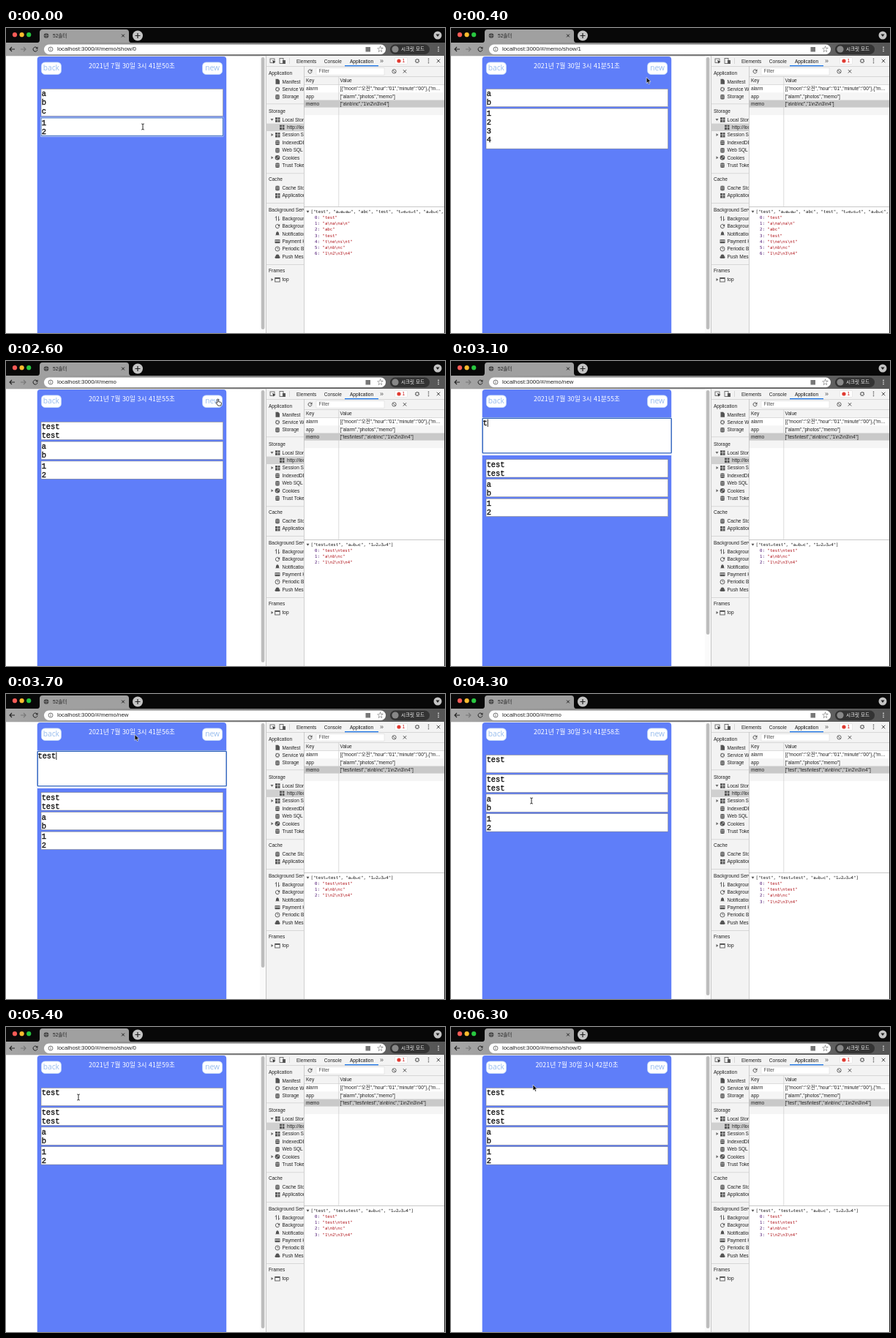
Animation of 600x417 px, one loop 6400 ms. Source, as an HTML page:

```html
<!DOCTYPE html>
<html lang="ko">
<head>
<meta charset="utf-8">
<style>
  html, body { margin: 0; width: 100%; height: 100%; overflow: hidden; background: #fff; }
  svg { display: block; width: 600px; height: 417px; font: 6.55px "Liberation Sans", "Noto Sans CJK KR", "Noto Sans CJK", sans-serif; }
  text { white-space: pre; }
  .mono { font: 5.7px "DejaVu Sans Mono", monospace; }
  .memo { font: 10.3px "Liberation Mono", monospace; stroke: #111; stroke-width: .35px; }
  .clock { font: 500 8.9px "Noto Sans CJK KR", "Noto Sans CJK", sans-serif; }
  .button { font: 10.2px "Open Sans", sans-serif; }
  .url { font-size: 7.84px; }
</style>
</head>
<body>
<svg viewBox="0 0 600 417">
  <defs>
    <linearGradient id="bar"><stop stop-color="#a6a6a6"/><stop offset=".4" stop-color="#858585"/><stop offset="1" stop-color="#555"/></linearGradient>
    <clipPath id="side"><path d="M355 38h52v379h-52z"/></clipPath>
    <clipPath id="pane"><path d="M407 38h191v379H407z"/></clipPath>
  </defs>
  <g id="chrome"></g>
  <g id="page"></g>
  <g id="tools"></g>
  <g id="data" clip-path="url(#pane)"></g>
  <g id="pointer"></g>
</svg>
<script>
const LOOP = 6400;
const BLUE = '#5f7ef9';
const $ = id => document.getElementById(id);
const esc = s => s.replace(/&/g, '&amp;').replace(/</g, '&lt;');
const rect = (x, y, w, h, fill, more = '') => `<rect x="${x}" y="${y}" width="${w}" height="${h}" fill="${fill}" ${more}/>`;
const dot = (x, y, r, fill, more = '') => `<circle cx="${x}" cy="${y}" r="${r}" fill="${fill}" ${more}/>`;
const ring = (x, y, r, width, dash = '') => dot(x, y, r, 'none', `stroke="#555" stroke-width="${width}" stroke-dasharray="${dash}"`);
const line = (d, color = '#555', width = 1, fill = 'none') => `<path d="${d}" fill="${fill}" stroke="${color}" stroke-width="${width}"/>`;
const text = (x, y, s, fill = '#222', more = '') => `<text x="${x}" y="${y}" fill="${fill}" ${more}>${esc(s)}</text>`;
const cross = (x, y, r, color, width = 1) => line(`M${x - r} ${y - r}l${2 * r} ${2 * r}m0 ${-2 * r}l${-2 * r} ${2 * r}`, color, width);
const kebab = (x, y, color) => [-2.6, 0, 2.6].map(d => dot(x, y + d, .8, color)).join('');
const reload = (x, y, r, color) => line(`M${x + r * .7} ${y - r * .7}A${r} ${r} 0 1 0 ${x + r} ${y + r * .2}`, color)
  + `<path d="M${x + r + .5} ${y - r - .5}v3h-3z" fill="${color}"/>`;

// Browser frame
function drawChrome() {
  const lights = ['#fc5b57', '#fdbc2e', '#28c840'].map((c, i) => dot(12 + i * 9.6, 9.2, 3.1, c)).join('');
  return rect(0, 0, 600, 20, '#080808') + lights
    + `<path d="M43 20q3 0 3-4V6q0-4 4-4H164q4 0 4 4v10q0 4 3 4z" fill="#a0a0a0"/>`
    + dot(55, 10.5, 3.3, '#444') + line('M52 10.5h6M55 7.5v6', '#999', .6)
    + text(64, 12.7, '52솔터') + cross(160, 10.5, 1.9, '#222')
    + dot(180, 10.5, 7, '#c4c4c4') + line('M176.5 10.5h7M180 7v7', '#222', 1.2)
    + dot(590, 10, 5.5, '#c4c4c4') + '<path d="M587.5 8.5h5l-2.5 3.5z" fill="#222"/>'
    + rect(0, 20, 600, 18.5, 'url(#bar)')
    + line('M12 29H5m3-3l-3 3 3 3', '#222', 1.1) + line('M20 29h7m-3-3l3 3-3 3', '#777', 1.1)
    + reload(40, 29, 3, '#222')
    + rect(52, 22.5, 467, 13.5, '#fff', 'rx="6.7"')
    + ring(61, 29, 3, .8) + line('M61 28.5v2.2M61 27v.8', '#555', .8)
    + rect(491.5, 26, 6.5, 6.5, '#777') + text(507, 32, '☆', '#333', 'font-size="9"')
    + rect(525, 22.5, 54, 13.5, '#333', 'rx="6.7"') + dot(532, 29, 4.6, '#888')
    + text(540, 31.4, '시크릿 모드', '#fff') + kebab(591, 29, '#f0f0f0');
}

// Developer tools: everything that never changes
function drawTools() {
  const icons = {
    db: y => rect(368, y - 3, 6, 6.5, '#555', 'rx="2"') + line(`M368 ${y - 1}h6m-6 2.2h6`, '#f3f3f3', .6),
    gear: y => ring(371, y, 2.3, 1.5, '1.4 .5'),
    grid: (y, x = 368) => rect(x, y - 3, 6.5, 6.5, '#555') + line(`M${x} ${y}h7m-3.5-3v6.5`, '#f3f3f3', .6),
    file: y => `<path d="M368.5 ${y - 3.5}h3.5l2 2v5h-5.5z" fill="#555"/>`,
    cookie: y => dot(371, y, 3.3, '#555') + dot(372, y - 1, .8, '#f3f3f3') + dot(370, y + 1, .7, '#f3f3f3'),
    arrows: y => line(`M369.5 ${y + 3}v-6l-1.5 2m4.5-2v6l1.5-2`, '#555', .9),
    bell: y => `<path d="M368 ${y + 2}l1-1v-2q2-4 4 0v2l1 1z" fill="#555"/>`,
    card: y => rect(367.5, y - 2.5, 7, 5, '#555', 'rx=".6"') + rect(367.5, y - 1, 7, 1, '#f3f3f3'),
    clock: y => ring(371, y, 3, .9) + line(`M371 ${y - 2}v2h1.5`, '#555', .7),
    sync: y => reload(371, y, 2.6, '#555'),
    cloud: y => dot(371, y - .5, 2.5, '#555') + rect(367.5, y - .5, 7, 3, '#555', 'rx="1.5"'),
    frame: y => rect(367.7, y - 2.5, 6.5, 5.5, 'none', 'stroke="#555" stroke-width=".9"') + rect(368, y - 2.5, 6, 1.5, '#555')
  };
  const heading = (y, s) => text(359, y + 2.4, s);
  const item = (y, s, icon, open = '') => icons[icon](y) + text(377.5, y + 2.4, s)
    + (open && `<path d="${open === 'down' ? `M361.5 ${y - 1.3}h4l-2 3z` : `M362.5 ${y - 2}v4l3-2z`}" fill="#666"/>`);
  const sidebar = rect(355, 130.6, 52, 10.4, '#d0d0d0')
    + [[61.5, 'Application'], [113.5, 'Storage'], [207, 'Cache'], [249, 'Background Services'], [331.5, 'Frames']].map(a => heading(...a)).join('')
    + [103.5, 198.5, 239, 323].map(y => rect(355, y, 52, .7, '#ccc')).join('')
    + [[73.2, 'Manifest', 'file'], [83.7, 'Service Workers', 'gear'], [94, 'Storage', 'db'],
       [125.3, 'Local Storage', 'grid', 'down'], [146, 'Session Storage', 'grid', 'right'], [156.4, 'IndexedDB', 'db'],
       [167, 'Web SQL', 'db'], [177.2, 'Cookies', 'cookie', 'right'], [187.5, 'Trust Tokens', 'db'],
       [218.7, 'Cache Storage', 'db'], [229, 'Application Cache', 'grid'],
       [260.5, 'Background Fetch', 'arrows'], [271, 'Background Sync', 'sync'], [281.3, 'Notifications', 'bell'],
       [291.7, 'Payment Handler', 'card'], [302, 'Periodic Background Sync', 'clock'], [312.4, 'Push Messaging', 'cloud'],
       [344, 'top', 'frame', 'right']].map(a => item(...a)).join('')
    + icons.grid(135.6, 374) + text(384, 137.9, 'http://localhost:3000');
  const cell = (y, key, value) => text(410, y, key) + text(456.5, y, value);
  return rect(355, 38, 245, 379, '#f3f3f3') + rect(355, 38, .8, 379, '#bbb')
    + rect(361, 42, 6, 5.5, 'none', 'stroke="#555" stroke-width=".8"') + '<path d="M364 44l4.5 2-2 .7-.8 2z" fill="#333"/>'
    + rect(374, 41.5, 5, 7, 'none', 'stroke="#555" stroke-width=".8"') + rect(378, 44, 4, 5, '#555')
    + rect(387, 41, .7, 8, '#ccc')
    + text(397, 47.6, 'Elements') + text(434.8, 47.6, 'Console') + text(470, 47.6, 'Application', '#111') + text(511, 47.6, '»', '#555', 'font-size="9"')
    + rect(531.5, 40.5, 17, 9, '#fff', 'stroke="#ddd" stroke-width=".6" rx="1"') + dot(537, 45, 2.6, '#e03a31') + text(541.5, 47.4, '1', '#c22')
    + ring(562, 45, 2.3, 1.6, '1.3 .5') + kebab(577.5, 45, '#555') + cross(591, 45, 2.3, '#555')
    + rect(355, 52, 245, .7, '#ccc') + rect(463, 51, 46, 1.3, '#1a73e8')
    + `<g clip-path="url(#side)">${sidebar}</g>`
    + rect(407, 77, 192, 340, '#fff')
    + reload(415.5, 59.3, 2.5, '#555') + rect(424, 54.5, 93, 9.7, '#fff', 'stroke="#ddd" stroke-width=".6"') + text(427.5, 61.4, 'Filter', '#555')
    + ring(530.5, 59.3, 2.7, .9) + line('M528.6 57.4l3.8 3.8', '#555', .9) + cross(545, 59.3, 2.2, '#555')
    + rect(407, 66, 192, .7, '#ccc') + rect(407, 77, 192, .7, '#ccc')
    + cell(74.4, 'Key', 'Value') + rect(407, 88.2, 192, 10.3, '#f5f5f5') + rect(407, 98.5, 192, 10.3, '#c9c9c9') + rect(407, 108.8, 192, 10.3, '#f5f5f5')
    + cell(85.4, 'alarm', '[{"moon":"오전","hour":"01","minute":"00"},{"m…') + cell(95.7, 'app', '["alarm","photos","memo"]') + text(410, 106, 'memo')
    + rect(454.5, 66, .7, 178, '#ccc') + rect(407, 52, .7, 365, '#bbb') + rect(407, 244, 192, .8, '#bbb')
    + rect(599, 38, 1, 379, '#222');
}

// Story of the session, times in ms
const routes = [[0, '/show/0'], [100, '/show/1'], [600, '/new'], [2000, ''], [2700, '/new'], [3900, ''], [4600, '/show/3'], [5100, '/show/1'], [5400, '/show/0']];
const ticks = [300, 800, 1200, 1900, 2500, 3200, 3800, 4300, 5000, 5700];
const path = [[0, 187, 135], [100, 187, 135], [500, 282, 55], [1900, 282, 55], [2000, 62, 55], [2100, 62, 55], [2500, 290, 56],
  [3600, 290, 56], [3800, 62, 55], [3900, 62, 55], [4300, 110, 146], [4500, 106, 171], [4600, 106, 171], [4900, 98, 127],
  [5100, 98, 120], [5400, 99, 96], [5800, 104, 92], [6300, 112, 79]];
const stale = ['test', 'a\na\na\n', 'abc', 'test', 't\ne\ns\nt', 'a\nb\nc', '1\n2\n3\n4'];

function memosAt(t) {
  const memos = ['a\nb\nc', '1\n2\n3\n4'];
  if (t >= 2000) memos.unshift('test\ntest');
  if (t >= 3900) memos.unshift('test');
  return memos;
}

function draftAt(t) {
  if (t >= 2000) return 'test'.slice(0, Math.max(0, (t - 3000) / 100));
  const typed = t < 1500 ? Math.min(4, Math.max(0, (t - 800) / 100)) : (t - 1400) / 100;
  return 'test\ntest'.slice(0, typed);
}

function pointerAt(t) {
  const i = path.findIndex((p, n) => n === path.length - 1 || path[n + 1][0] > t);
  const [a, b] = [path[i], path[i + 1] || path[i]];
  const k = b === a ? 0 : (t - a[0]) / (b[0] - a[0]);
  const ease = k * k * (3 - 2 * k);
  return [a[1] + (b[1] - a[1]) * ease, a[2] + (b[2] - a[2]) * ease];
}

function drawPage(t, route, memos) {
  const editing = route === '/new';
  const open = route.startsWith('/show/') ? +route.slice(6) : -1;
  const seconds = 50 + ticks.filter(s => s <= t).length;
  const time = `2021년 7월 30일 3시 ${41 + Math.floor(seconds / 60)}분${seconds % 60}초`;
  const button = (x, s) => rect(x, 46.9, 27, 16.6, '#fff', 'rx="5" stroke="#c3daf6" stroke-width=".8"')
    + text(x + 13.5, 58.4, s, '#98bdee', 'class="button" text-anchor="middle"');
  let out = rect(0, 38.5, 355, 379, '#fff') + rect(347, 38.5, 8, 379, '#fafafa')
    + rect(348.8, 40, 4.6, editing ? 334 : 372, '#bdbdbd', 'rx="2.3"')
    + rect(42.7, 39, 258.5, 390, BLUE, 'rx="4"')
    + text(172, 55, time, '#fff', 'class="clock" text-anchor="middle"') + button(48.4, 'back') + button(268.6, 'new');
  if (editing) {
    const lines = draftAt(t).split('\n');
    const row = lines.length - 1;
    out += rect(42.7, 77, 258.5, 52, '#fff') + rect(43.2, 78.3, 258, 47.6, '#fff', 'stroke="#2e62bd" stroke-width="1.4" rx="1"')
      + lines.map((s, i) => text(43.5, 88 + i * 12, s, '#111', 'class="memo"')).join('')
      + rect(43.6 + lines[row].length * 6.2, 79.5 + row * 12, .9, 10.5, '#111');
  }
  let y = editing ? 134.6 : 83.3, bottom = y;
  memos.forEach((memo, i) => {
    const lines = memo.split('\n');
    const shown = i === open ? lines : lines.slice(0, 2);
    const height = [24.4, 24.4, 37.2, 55][shown.length - 1];
    const focused = t < 100 && i === 1;
    if (focused) out += rect(47, y - 1.2, 250.4, height + 2.4, '#fff', 'rx="1"');
    out += rect(48, y, 248.6, height, '#fff', focused ? 'stroke="#2e62bd"' : 'stroke="#767676" stroke-width=".5"')
      + shown.map((s, n) => text(48.7, y + 10.1 + n * 12, s, '#111', 'class="memo"')).join('');
    bottom = y + height;
    y = bottom + 2.4;
  });
  return { out, bottom };
}

function drawData(memos, stored) {
  const preview = '[' + stored.map(s => `"${s.replace(/\n/g, '↵')}"`).join(', ') + ']';
  return text(456.5, 106, JSON.stringify(memos))
    + '<path d="M410.5 249.7h4l-2 3z" fill="#555"/>' + text(416.5, 253, preview, '#111', 'class="mono"')
    + stored.map((s, i) => text(422, 260.9 + i * 8.2, i + ':', '#4a1270', 'class="mono"')
      + text(432.5, 260.9 + i * 8.2, JSON.stringify(s), '#ae0f16', 'class="mono"')).join('');
}

function drawPointer(t, bottom) {
  if ((t >= 900 && t < 1900) || (t >= 3000 && t < 3600)) return '';
  const [x, y] = pointerAt(t);
  const onButton = y > 46 && y < 64 && (x < 76 || x > 268);
  const shape = onButton
    ? line('M-1.2-3.5q1-1 1.8 0v3.2l3 .7q1 .3.8 1.5l-.6 3.2h-4l-2.7-3.7q0-1.3 1.7-.2z', '#111', .8, '#fff')
    : y > 83 && y < bottom
      ? line('M-1.8-4Q0-4 0-3Q0-4 1.8-4M0-3v6M-1.8 4Q0 4 0 3Q0 4 1.8 4', '#111', .9)
      : line('M0 0v8l1.9-1.7 1.3 2.9 1.4-.6-1.3-2.8h2.6z', '#fff', .6, '#111');
  return `<g transform="translate(${x} ${y})">${shape}</g>`;
}

let last = -1;
function frame(now) {
  const t = Math.floor(now % LOOP / 100) * 100;
  if (t !== last) {
    last = t;
    const route = routes.filter(r => r[0] <= t).pop()[1];
    const memos = memosAt(t);
    const page = drawPage(t, route, memos);
    $('page').innerHTML = page.out + text(70, 31.4, 'localhost:3000/#/memo' + route, '#222', 'class="url"');
    $('data').innerHTML = drawData(memos, t < 2000 ? stale : memos);
    $('pointer').innerHTML = drawPointer(t, page.bottom);
  }
  requestAnimationFrame(frame);
}

$('chrome').innerHTML = drawChrome();
$('tools').innerHTML = drawTools();
frame(performance.now());
</script>
</body>
</html>
```
